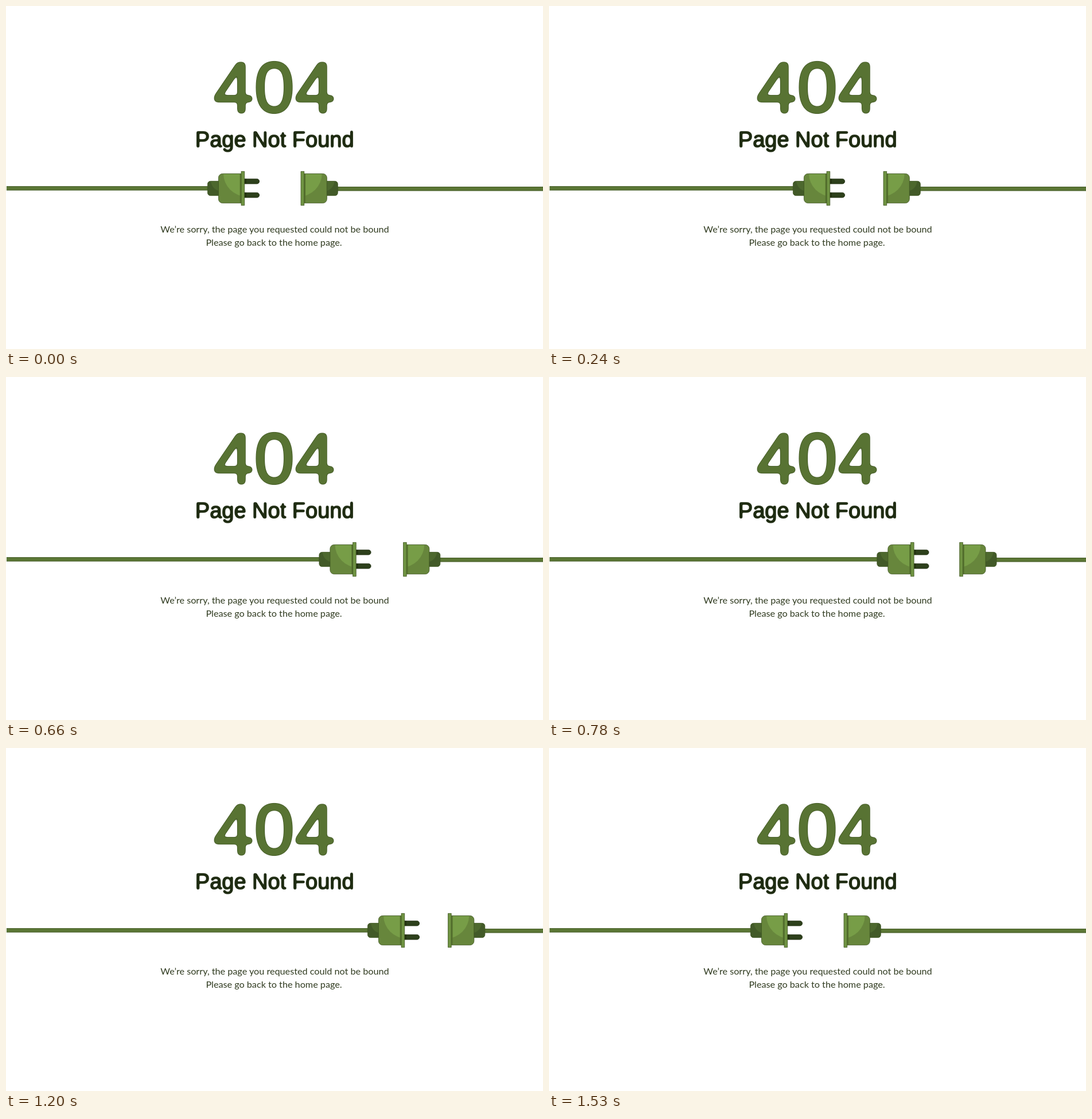
These frames come from a looping animation (936 by 598 pixels, 2.86 s). An HTML page with a canvas:

```html
<!DOCTYPE html>
<html lang="en">
<head>
<meta charset="utf-8">
<title>404</title>
<style>
  html, body { margin: 0; width: 100%; height: 100%; overflow: hidden; background: #fff; }
  svg, canvas { position: absolute; left: 0; top: 0; width: 936px; height: 598px; }
  .round { font-family: "Liberation Sans", Arial, sans-serif; fill: #1f2c12; }
  .code { font-size: 125px; letter-spacing: 1.5px; }
  .title { font-size: 38px; }
  .note { font: 400 16.2px Lato, "Open Sans", sans-serif; fill: #303b20; }
</style>
</head>
<body>
<svg viewBox="0 0 936 598">
  <defs>
    <!-- Blur and a low threshold: thickens the letters and rounds their ends -->
    <filter id="soft" color-interpolation-filters="sRGB">
      <feGaussianBlur stdDeviation="3.3" result="blur"/>
      <feColorMatrix in="blur" values="0 0 0 0 .247  0 0 0 0 .341  0 0 0 0 .129  0 0 0 10 -2" result="edge"/>
      <feColorMatrix in="blur" values="0 0 0 0 .345  0 0 0 0 .451  0 0 0 0 .2  0 0 0 10 -2.9" result="face"/>
      <feMerge>
        <feMergeNode in="edge"/>
        <feMergeNode in="face"/>
      </feMerge>
    </filter>
    <filter id="softer" color-interpolation-filters="sRGB">
      <feGaussianBlur stdDeviation="1.15"/>
      <feColorMatrix values="1 0 0 0 0  0 1 0 0 0  0 0 1 0 0  0 0 0 3.4 -.35"/>
    </filter>
  </defs>
  <g class="round">
    <text class="code" x="361.8" y="184.6" filter="url(#soft)">404</text>
    <text class="title" x="468.2" y="246" text-anchor="middle" filter="url(#softer)">Page Not Found</text>
  </g>
  <g class="note" text-anchor="middle">
    <text x="468.5" y="394.5">We’re sorry, the page you requested could not be bound</text>
    <text x="467" y="417.7">Please go back to the home page.</text>
  </g>
</svg>
<canvas id="stage" width="936" height="598"></canvas>
<script>
const ctx = document.getElementById('stage').getContext('2d');
const LOOP = 2860, STEP = 30, RESET = 1530;
const EDGE = '#3d5420';

// Time in ms, travel of the plug, travel of the socket
const keys = [
  [0, 0, 0], [240, 74, 69], [420, 129, 119], [540, 161.5, 149.5], [660, 194.5, 178.5],
  [930, 249, 227.5], [1080, 267, 244.5], [1200, 279, 256.5], [1500, 286.5, 263.5]
];

function slope(i, col) {
  const a = keys[Math.max(i - 1, 0)], b = keys[Math.min(i + 1, keys.length - 1)];
  return i === keys.length - 1 ? 0 : (b[col] - a[col]) / (b[0] - a[0]);
}

// Smooth curve through the keys
function travel(t, col) {
  if (t >= RESET) return 0;
  let i = 0;
  while (i < keys.length - 2 && t >= keys[i + 1][0]) i++;
  const a = keys[i], b = keys[i + 1], h = b[0] - a[0];
  const u = Math.min((t - a[0]) / h, 1), v = 1 - u;
  return v * v * (1 + 2 * u) * a[col] + u * u * (3 - 2 * u) * b[col]
    + h * u * v * (v * slope(i, col) - u * slope(i + 1, col));
}

function box(x, y, w, h, radii, fill, line = EDGE) {
  ctx.beginPath();
  ctx.roundRect(x, y, w, h, radii);
  ctx.fillStyle = fill;
  ctx.fill();
  if (line) {
    ctx.strokeStyle = line;
    ctx.lineWidth = 0.8;
    ctx.stroke();
  }
}

// Box with a lighter disc clipped to it
function shaded(x, y, w, h, radii, dark, light, cx, cy, r) {
  box(x, y, w, h, radii, dark, null);
  ctx.save();
  ctx.clip();
  ctx.beginPath();
  ctx.arc(cx, cy, r, 0, 7);
  ctx.fillStyle = light;
  ctx.fill();
  ctx.restore();
  box(x, y, w, h, radii, 'transparent');
}

function cord(x, y, end) {
  ctx.fillStyle = '#425a24';
  ctx.fillRect(x, y, end - x, 7.5);
  ctx.fillStyle = '#5b7735';
  ctx.fillRect(x, y + 1, end - x, 5.4);
}

function prong(y) {
  box(415, y, 26.6, 8.6, [0, 4.3, 4.3, 0], '#2d401b', '#1f2d11');
  ctx.fillStyle = '#22310f';
  ctx.fillRect(415, y, 4, 8.6);
}

function head() {
  shaded(351.4, 305.4, 23, 25.2, [5, 0, 0, 5], '#425a28', '#4d682e', 376, 304, 19);
  shaded(370.4, 292.4, 41, 51.2, [7, 0, 0, 7], '#67863c', '#779d47', 419, 292, 40);
  ctx.fillStyle = '#56722f';
  ctx.fillRect(407.6, 292.8, 2.4, 50.4);
  box(410, 288.4, 5.7, 59.2, 0, '#6f9342');
}

function draw(t) {
  const plug = travel(t, 1), socket = travel(t, 2);
  ctx.clearRect(0, 0, 936, 598);

  cord(1, 314.1, 356 + plug);
  ctx.save();
  ctx.translate(plug, 0);
  prong(301.4);
  prong(325.4);
  head();
  ctx.restore();

  cord(574 + socket, 315, 936);
  ctx.save();
  ctx.translate(929.7 + socket, 0);
  ctx.scale(-1, 1);
  head();
  ctx.restore();
}

function tick() {
  const t = performance.now() % LOOP;
  draw(Math.floor(t / STEP) * STEP);
  requestAnimationFrame(tick);
}
tick();
</script>
</body>
</html>
```
